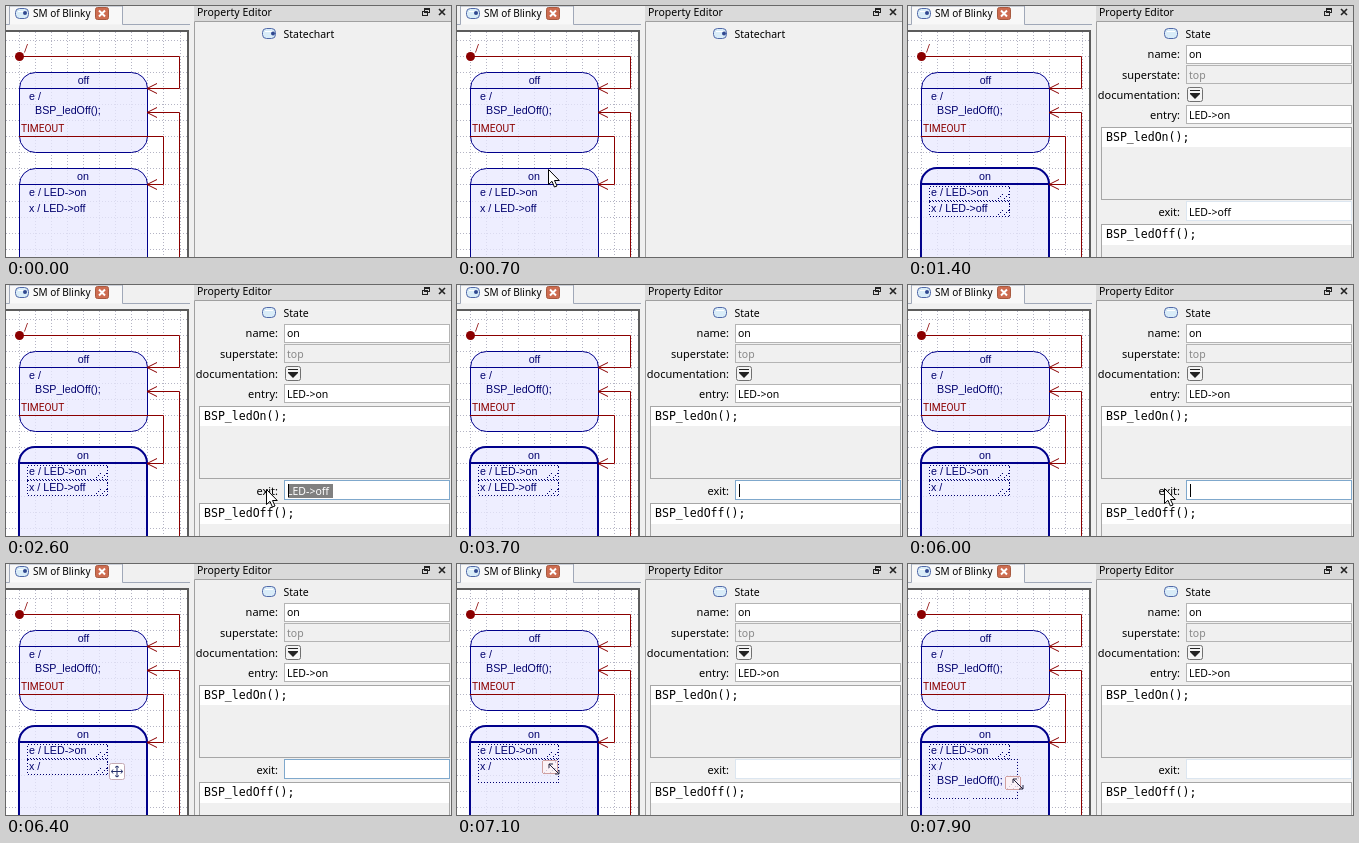
Write an HTML page that moves like this. It is 445 by 251 pixels and loops after 8000 ms.

```html
<!DOCTYPE html>
<html lang="en">
<head>
<meta charset="utf-8">
<title>State machine editor</title>
<style>
  html, body { margin: 0; width: 100%; height: 100%; overflow: hidden; background: #f0f0f0; }
  svg { display: block; }
  text { font: 10.5px "Noto Sans", "Open Sans", sans-serif; fill: #000; white-space: pre; }
  .chart text { font: 10.7px "Liberation Sans", Arial, sans-serif; fill: #00006e; }
  .chart text.event { font: 10.2px Roboto, sans-serif; fill: #8b0000; }
  text.code { font: 11.55px "DejaVu Sans Mono", monospace; }
  text.tab { font-size: 10px; }
  text.label { font-size: 11px; text-anchor: end; }
  .mid { text-anchor: middle; }
  .field { fill: #fff; stroke: #b4b4b4; }
  .state { fill: #e8e8ff; fill-opacity: .75; stroke: #00008b; }
  .wire { fill: none; stroke: #8b0000; }
  .dots { fill: none; stroke: #00006e; stroke-dasharray: 1 2; }
  .crisp { shape-rendering: crispEdges; }
</style>
</head>
<body>
<svg width="445" height="251" viewBox="0 0 445 251">
  <defs>
    <clipPath id="canvasClip"><rect y="25" width="182" height="226"/></clipPath>
    <clipPath id="pickClip"><rect id="pickArea" y="199" height="14"/></clipPath>
    <g id="stateIcon">
      <rect x=".5" y=".5" width="13" height="10" rx="4" fill="#d9ecf8" stroke="#5068a8"/>
      <path d="M3 3.5H11" stroke="#fff"/>
    </g>
  </defs>

  <rect width="445" height="251" fill="#f0f0f0"/>

  <!-- tab bar -->
  <path d="M0 18.5H3.5V0H116.5V18.5H184" fill="#f8f8f8" stroke="#a0a8b8"/>
  <use href="#stateIcon" x="9" y="2"/>
  <circle cx="19" cy="7" r="2" fill="#304890"/>
  <text class="tab" x="27" y="11">SM of Blinky</text>
  <rect x="89.5" y="1.5" width="13" height="12" rx="2" fill="#cd6c50" stroke="#a85a40"/>
  <path d="M93 4.5l6 6m0-6l-6 6" stroke="#fff" stroke-width="2"/>

  <!-- diagram -->
  <g class="chart" clip-path="url(#canvasClip)">
    <rect y="24" width="182" height="227" fill="#fff"/>
    <path id="grid" class="crisp" fill="none" stroke="#b4b4c4" stroke-dasharray="1 2"/>
    <rect class="state" x="13.5" y="66.5" width="128" height="80" rx="16"/>
    <path d="M13 82.5H142" stroke="#00008b"/>
    <text class="mid" x="77.5" y="78">off</text>
    <text x="23" y="94">e /</text>
    <text x="29" y="108">BSP_ledOff();</text>

    <g id="onState">
      <rect class="state" x="13.5" y="162.5" width="128" height="120" rx="16"/>
      <path d="M13 178.5H142" stroke="#00008b"/>
    </g>
    <text class="mid" x="77" y="174">on</text>
    <text x="23" y="190">e / LED-&gt;on</text>
    <text id="exitNote" x="23" y="206"></text>
    <text id="exitCode" x="29" y="220">BSP_ledOff();</text>

    <g class="wire">
      <path d="M13 50.5H173.5V82.5H141m10-5l-10 5l10 5"/>
      <path d="M173.5 251V106.5H141m10-5l-10 5l10 5"/>
      <path d="M13 130.5H157.5V178.5H141m10-5l-10 5l10 5"/>
    </g>
    <circle cx="13.5" cy="50.5" r="4.5" fill="#8b0000"/>
    <text class="event" x="18" y="46">/</text>
    <text class="event" x="15" y="126">TIMEOUT</text>

    <g id="marks" class="crisp">
      <path class="dots" d="M21.5 180.5H101.5V194.5H21.5ZM90 192.5l12-11m-6 11l6-5"/>
      <path id="exitBox" class="dots"/>
      <path id="corner" class="dots" d="M-6 5.5l12-11m-6 11l6-5"/>
      <rect id="grip" x="-7.5" y="-6.5" width="15" height="13" rx="2" fill="#fff4f4" fill-opacity=".8" stroke="#d0a0a0"/>
    </g>
  </g>
  <path d="M0 25H182V251" fill="none" stroke="#5c5c5c" stroke-width="2"/>

  <!-- property panel -->
  <rect x="188" width="257" height="15" fill="#dadada"/>
  <path d="M188.5 251V15.5H445" fill="none" stroke="#a0a0a0"/>
  <text x="191" y="10">Property Editor</text>
  <path class="crisp" d="M418.5 2.5h5v4h-5zM416.5 5.5h5v4h-5zM418 3h6" fill="none" stroke="#222"/>
  <path d="M433 3l6 6m0-6l-6 6" stroke="#222" stroke-width="1.6"/>
  <use href="#stateIcon" x="256" y="22"/>
  <circle id="iconDot" cx="267" cy="27.5" r="2" fill="#304890"/>
  <text id="kind" x="277.5" y="32"></text>

  <g id="form">
    <g id="labels"></g>
    <g class="crisp">
      <rect class="field" x="278.5" y="39.5" width="165" height="18"/>
      <rect class="field" x="278.5" y="59.5" width="165" height="18" style="fill:#f0f0f0"/>
      <rect class="field" x="278.5" y="99.5" width="165" height="18"/>
      <rect id="exitField" class="field" x="278.5" y="195.5" width="165" height="19"/>
      <path d="M194 122H444V141H194ZM194 219H444V239H194Z" fill="#fff"/>
      <path d="M193.5 121.5H443.5V193.5H193.5ZM193.5 251V218.5H443.5V251" fill="none" stroke="#a6a6a6"/>
    </g>
    <rect x="279.5" y="81.5" width="15" height="14" rx="2" fill="#f4f4f4" stroke="#707070"/>
    <path d="M282 84.5h10M282 87.5h10" stroke="#222"/>
    <path d="M282 88h10l-5 5z" fill="#222"/>
    <text x="281" y="52">on</text>
    <text x="281" y="73" style="fill:#888">top</text>
    <text x="281" y="113">LED-&gt;on</text>
    <text class="code" x="198" y="135">BSP_ledOn();</text>
    <text class="code" x="198" y="232">BSP_ledOff();</text>
    <g id="exitText">
      <text x="281" y="210">LED-&gt;off</text>
      <g clip-path="url(#pickClip)">
        <rect x="282" y="199" width="45" height="14" fill="#808080"/>
        <text x="281" y="210" style="fill:#fff">LED-&gt;off</text>
      </g>
    </g>
    <rect id="caret" x="282" y="199" width="1" height="13"/>
  </g>

  <!-- pointers, placed by their hot spot -->
  <path id="arrow" d="M.5 .5V15.5L4 12.3L6.4 18L9 17L6.5 11.5H11.3Z" fill="#fff" stroke="#000"/>
  <g id="move">
    <rect x="-6.5" y="-7.5" width="15" height="16" rx="2" fill="#fff" stroke="#c4aab4"/>
    <path d="M-4.5 .5H6.5M1 -5V6M-3 -1.5L-4.5 .5L-3 2.5M5 -1.5L6.5 .5L5 2.5M-1 -3.5L1 -5L3 -3.5M-1 4.5L1 6L3 4.5" fill="none" stroke="#26306a"/>
  </g>
  <path id="resize" d="M-5 -5L5 5M-5 -1V-5H-1M5 1V5H1" fill="none" stroke="#22223c"/>
</svg>
<script>
  const LOOP = 8000;
  const GRID = 16.1;
  const $ = id => document.getElementById(id);
  const show = (id, on) => { $(id).style.display = on ? '' : 'none'; };
  const place = (id, x, y) => $(id).setAttribute('transform', `translate(${x} ${y})`);
  const within = (t, from, to) => t >= from && t < to;

  // [time, pointer, x, y]; the pointer is not seen over text fields
  const pointerSteps = [
    [0], [400, 'arrow', 178, 207], [500, 'arrow', 148, 192],
    [600, 'arrow', 112, 172], [700, 'arrow', 91, 163],
    [1300, 'arrow', 165, 182], [1400],
    [2500, 'arrow', 269, 204], [2600, 'arrow', 260, 204], [2700, 'arrow', 270, 204], [2800],
    [6000, 'arrow', 256, 203], [6100, 'arrow', 206, 203], [6200, 'arrow', 160, 203],
    [6300, 'move', 125, 206], [6400, 'move', 110, 207], [6500, 'move', 105, 206],
    [6600, 'move', 100, 205], [6700, 'resize', 97, 205]
  ];
  const caretFlips = [2500, 3100, 3600, 4300, 4800, 5200, 5700, 6200, 6700, 7100];
  const labels = { 'name:': 52, 'superstate:': 73, 'documentation:': 93, 'entry:': 113, 'exit:': 210 };

  $('labels').innerHTML = Object.entries(labels)
    .map(([name, y]) => `<text class="label" x="272" y="${y}">${name}</text>`).join('');

  const gridLines = Array.from({ length: 15 }, (_, i) => {
    const x = Math.floor(13 + GRID * i) + .5, y = Math.floor(34 + GRID * i) + .5;
    return (x < 182 ? `M${x} 26V251` : '') + `M0 ${y}H182`;
  });
  $('grid').setAttribute('d', gridLines.join(''));

  function drawPointer(t, drag) {
    const [, kind, x, y] = pointerSteps.findLast(step => step[0] <= t);
    for (const id of ['arrow', 'move', 'resize']) show(id, id === kind);
    if (kind) place(kind, x + 13 * drag, y + 15 * drag);
  }

  function drawExitBox(t, drag) {
    const dragging = t >= 7100;
    const right = dragging ? 101.5 + 8 * Math.round(drag) : 101.5;
    const bottom = dragging ? 218.5 + 8 * Math.round(drag * 2) : 210.5;
    $('exitBox').setAttribute('d', `M21.5 195.5H${right}V${bottom}H21.5Z`);
    const x = 93 + 12 * drag, y = 203 + 16 * drag;
    show('grip', t >= 6700);
    place('grip', x, y);
    place('corner', t < 6700 ? 96 : x, y);
    show('exitCode', t >= 7700);
  }

  function draw(t) {
    const picked = t >= 1000;
    const drag = Math.min(1, Math.max(0, (t - 7100) / 800));
    show('form', picked);
    show('marks', picked);
    $('kind').textContent = picked ? 'State' : 'Statechart';
    show('iconDot', !picked);
    $('onState').style.strokeWidth = picked ? 2 : 1;
    place('onState', picked ? -.5 : 0, picked ? -.5 : 0);
    $('exitNote').textContent = t < 4900 ? 'x / LED->off' : 'x /';

    $('exitField').style.stroke = within(t, 1500, 7100) ? '#7fa8cc' : '#dce6f0';
    show('exitText', t < 3700);
    const pickWidth = 45 * Math.min(1, Math.max(0, (t - 2200) / 300));
    $('pickArea').setAttribute('x', 327 - pickWidth);
    $('pickArea').setAttribute('width', pickWidth);
    show('caret', caretFlips.filter(flip => flip <= t).length % 2 === 1);

    drawExitBox(t, drag);
    drawPointer(t, drag);
  }

  const start = performance.now();
  function frame(now) {
    const t = Math.max(0, now - start) % LOOP;
    draw(Math.floor(t / 100) * 100);
    requestAnimationFrame(frame);
  }
  draw(0);
  requestAnimationFrame(frame);
</script>
</body>
</html>
```
